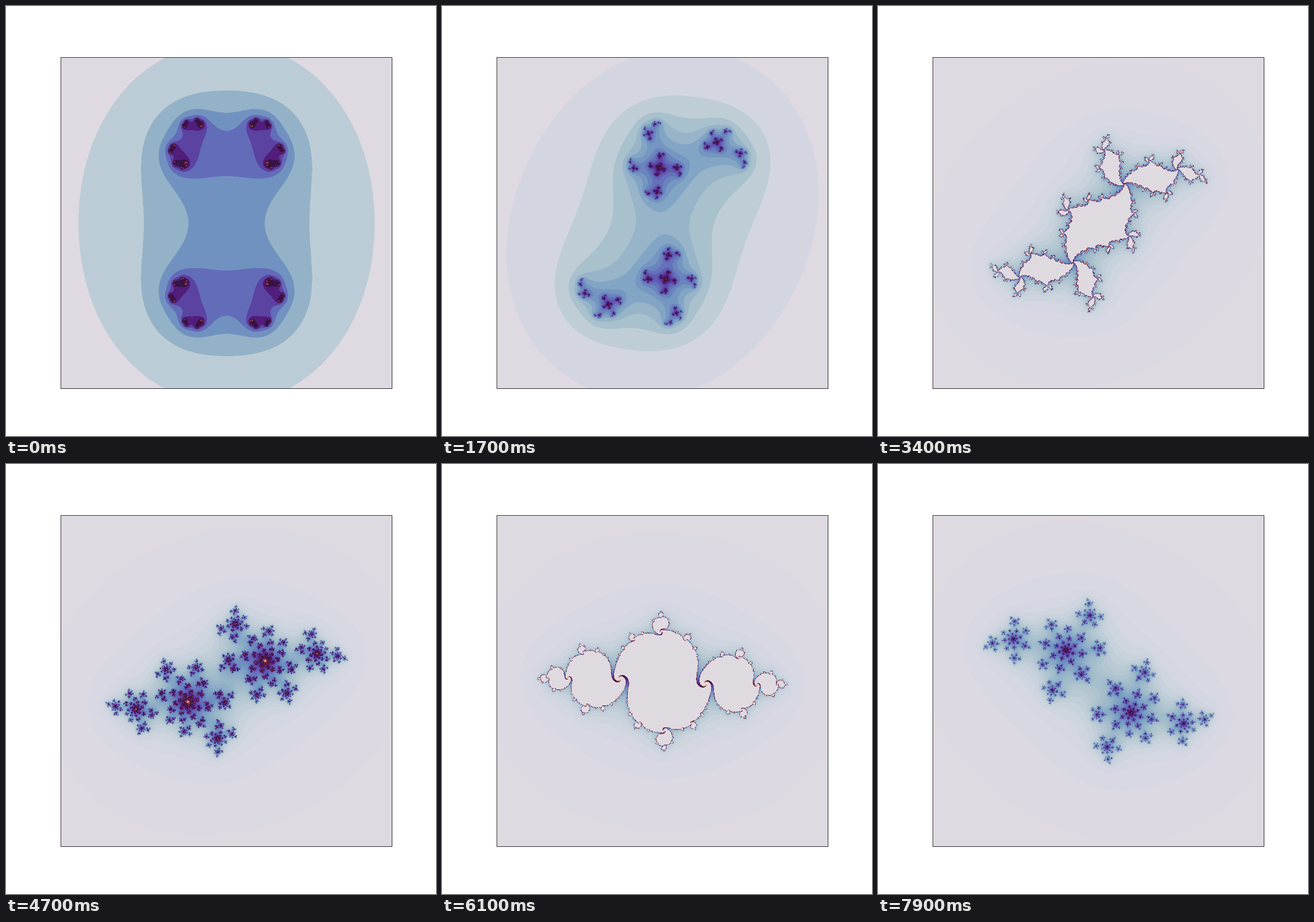
Write an HTML page with a canvas that moves like this. It is 748 px wide and 748 px high and loops after 8000 ms.

```html
<!DOCTYPE html>
<html lang="en">
<head>
<meta charset="utf-8">
<title>Julia sets</title>
<style>
  html, body { margin: 0; width: 100%; height: 100%; overflow: hidden; background: #fff; }
  canvas { position: absolute; left: 0; top: 0; }
</style>
</head>
<body>
<canvas id="stage" width="748" height="748"></canvas>
<script>
const ctx = document.getElementById('stage').getContext('2d');

// c travels round a circle; z -> z² + c is sampled on a square of side 4.
const STEP = 100, SHOWN = 80, TURN = 119, RADIUS = 0.7885;
const LIMIT = 100, ESCAPE = 16;
const GRID = 800, SIZE = 576, LEFT = 96, TOP = 90;
const CENTRE_X = 383.7, CENTRE_Y = 378, SCALE = 144;

// Evenly spaced key colours of a cyclic palette, joined by a smooth closed curve
const KEYS = ['dfd9e1', 'a7bfcc', '7192c0', '5f58b1', '521d7b',
              '2f1436', '641b4a', '9e3c50', 'c0725f', 'd0b09a'];
const COLOURS = 510;

function smooth(a, b, c, d, t) {
  return b + t / 2 * (c - a + t * (2 * a - 5 * b + 4 * c - d + t * (3 * (b - c) + d - a)));
}

function colourAt(p) {
  const k = Math.floor(p * KEYS.length), t = p * KEYS.length - k;
  const near = [-1, 0, 1, 2].map(n => parseInt(KEYS[(k + n + KEYS.length) % KEYS.length], 16));
  const channel = shift => Math.round(smooth(...near.map(v => v >> shift & 255), t));
  return (255 << 24 | channel(0) << 16 | channel(8) << 8 | channel(16)) >>> 0;
}
const palette = Uint32Array.from({ length: COLOURS }, (_, i) => colourAt(i / COLOURS));

const counts = new Uint8Array(GRID * GRID);
const image = ctx.createImageData(SIZE, SIZE);
const pixels = new Uint32Array(image.data.buffer);

function escapeCount(x, y, cx, cy) {
  for (let i = 0; i < LIMIT; i++) {
    const t = x * x - y * y + cx;
    y = 2 * x * y + cy;
    x = t;
    if (x * x + y * y > ESCAPE) return i;
  }
  return LIMIT - 1;
}

// Fills the grid and returns the largest count; z and -z share a value.
function sample(cx, cy) {
  const last = GRID * GRID - 1, d = 4 / (GRID - 1);
  let max = 1;
  for (let j = 0, n = 0; j < GRID / 2; j++) {
    for (let i = 0; i < GRID; i++, n++) {
      const v = escapeCount(i * d - 2, j * d - 2, cx, cy);
      counts[n] = counts[last - n] = v;
      if (v > max) max = v;
    }
  }
  return max;
}

// Grid cell and blend weight for each pixel along one axis
function axis(start, centre) {
  return Array.from({ length: SIZE }, (_, i) => {
    const s = ((start + i + 0.5 - centre) / SCALE + 2) * GRID / 4 - 0.5;
    const p = Math.min(Math.max(s, 0), GRID - 1.001), cell = Math.floor(p);
    return { cell, f: p - cell };
  });
}
const cols = axis(LEFT, CENTRE_X), rows = axis(TOP, CENTRE_Y);

function paint(step) {
  const a = 2 * Math.PI * step / TURN;
  const k = COLOURS / sample(RADIUS * Math.cos(a), RADIUS * Math.sin(a));
  let n = 0;
  for (const row of rows) {
    for (const col of cols) {
      const o = row.cell * GRID + col.cell;
      const top = counts[o] + (counts[o + 1] - counts[o]) * col.f;
      const q = o + GRID;
      const low = counts[q] + (counts[q + 1] - counts[q]) * col.f;
      const v = top + (low - top) * row.f;
      pixels[n++] = palette[Math.min(COLOURS - 1, v * k | 0)];
    }
  }
  ctx.putImageData(image, LEFT, TOP);
  ctx.strokeStyle = 'rgba(0, 0, 0, 0.8)';
  ctx.strokeRect(LEFT - 0.5, TOP - 0.5, SIZE, SIZE);
}

let shown = -1;
function tick() {
  const step = Math.floor(performance.now() / STEP) % SHOWN;
  if (step !== shown) {
    shown = step;
    ctx.clearRect(0, 0, 748, 748);
    paint(step);
  }
  requestAnimationFrame(tick);
}
tick();
</script>
</body>
</html>
```
